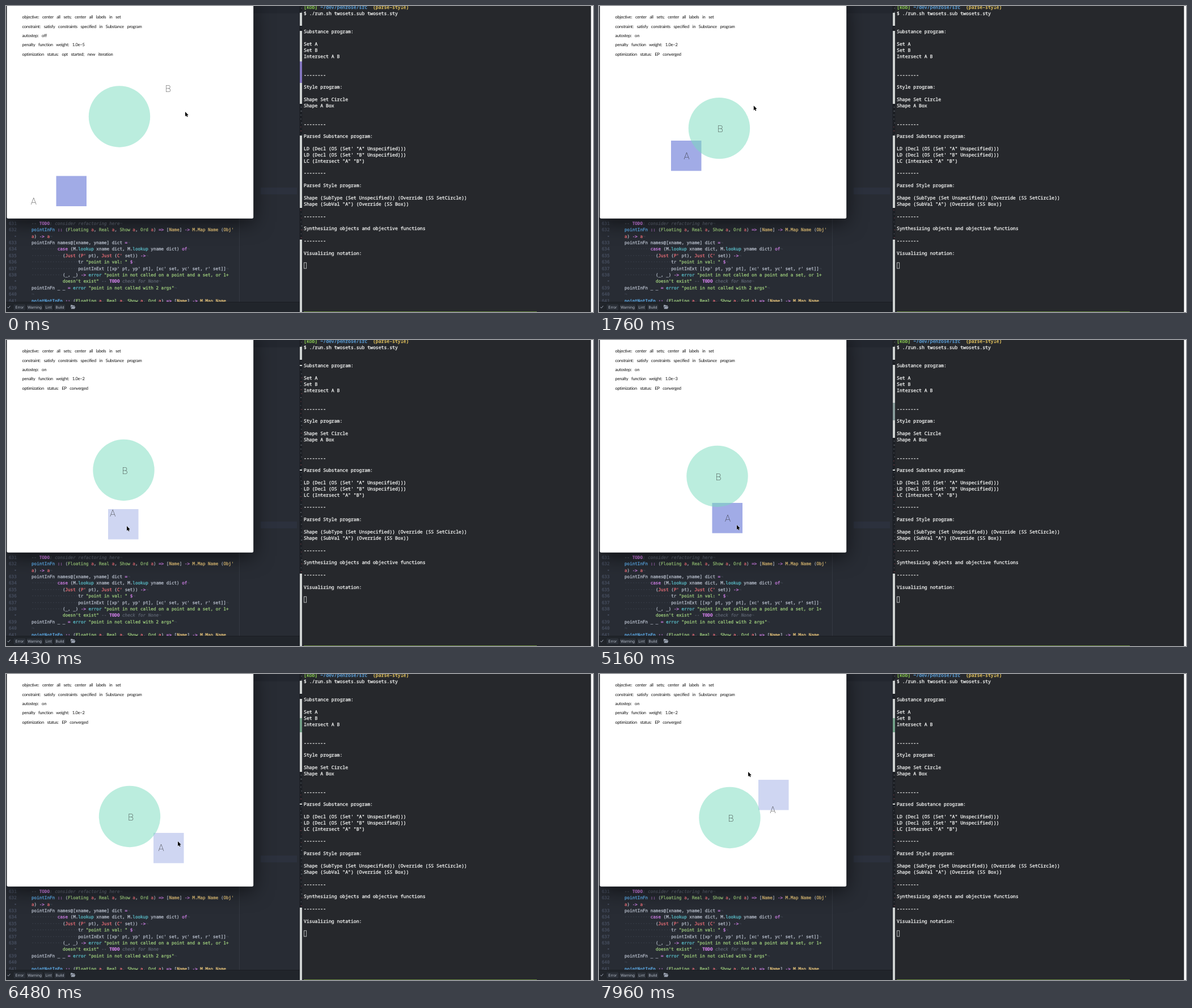
Recreate the animation shown at these times as an HTML page. Size 1035 by 541 pixels, loop 8000 ms.

```html
<!DOCTYPE html>
<html lang="en">
<head>
<meta charset="utf-8">
<title>Set diagram</title>
<style>
  html, body { margin: 0; width: 100%; height: 100%; overflow: hidden; background: #282c34; }
  svg { display: block; }
  text { white-space: pre; text-rendering: geometricPrecision; }
  .term { font: 8.13px "Noto Sans Mono", monospace; stroke-width: .3; }
  .code { font: 7.6px "DejaVu Sans Mono", monospace; stroke-width: .25; }
  .info { font: 7.6px Lato, sans-serif; letter-spacing: -.25px; word-spacing: 4px; stroke-width: 0; }
  .label { font: 200 16.8px Roboto, sans-serif; text-anchor: middle; fill: #222; }
  .bar { font: 6.4px Inter, sans-serif; stroke-width: 0; }
  .window { filter: drop-shadow(0 7px 17px rgba(0, 0, 0, .6)); }
</style>
</head>
<body>
<svg id="stage" width="1035" height="541" viewBox="0 0 1035 541"></svg>
<script>
const stage = document.getElementById('stage');
const colors = {
  w: '#b9c0cd', b: '#61b5f5', p: '#cf7fe6', g: '#a0d07e', c: '#5cc2cd', r: '#ee6f79', y: '#ecc87c',
  k: '#5c6370', d: '#3d434e', n: '#495162', t: '#f2f3f2', G: '#8fd653', B: '#5fa9e8', Y: '#f2cf62', x: '#111'
};

function set(el, attrs) {
  for (const key in attrs) el.setAttribute(key, attrs[key]);
  return el;
}
function add(tag, attrs, parent = stage) {
  return parent.appendChild(set(document.createElementNS('http://www.w3.org/2000/svg', tag), attrs));
}
function rect(x, y, width, height, fill, more) {
  return add('rect', { x, y, width, height, fill, ...more });
}
// A backtick and a letter switch the colour inside a line.
function text(cls, x, y, line, color = 'w') {
  const el = add('text', { class: cls, x, y });
  line.split(/(?=`)/).forEach(part => {
    const marked = part[0] === '`', tone = marked ? part[1] : color;
    const span = add('tspan', { fill: colors[tone], stroke: colors[tone] }, el);
    span.textContent = marked ? part.slice(2) : part;
    if (tone === 'k') span.setAttribute('font-style', 'italic');
    if (part.includes('TODO')) span.setAttribute('font-weight', 'bold');
  });
  return el;
}

// Editor
rect(0, 0, 518, 13, '#23272f');
rect(449, 321, 64, 12, '#2c313d');
rect(411, 376, 1, 147, '#343942');
const types = '`w(`gFloating `ra`w, `gReal `ra`w, `gShow `ra`w, `gOrd `ra`w) `p=> `w[`yName`w] `p-> `yM.Map Name';
const dots = n => '`d' + '·'.repeat(n);
[
  ['631', '`k-- `pTODO`k: consider refactoring here`d¬'],
  ['632', '`bpointInFn `p:: ' + types + " `w(`yObj'"],
  ['  •', '`ra`w) `p-> `ra`d¬'],
  ['633', 'pointInFn names@[xname, yname] dict `p=`d¬'],
  ['634', dots(10) + '`pcase `w(M.`clookup`w xname dict, M.`clookup`w yname dict) `pof`d¬'],
  ['635', dots(12) + "`w(`rJust `w(`rP'`w pt), `rJust `w(`rC'`w set)) `p->`d¬"],
  ['636', dots(18) + '`wtr `g"point in val: " `p$`d¬'],
  ['637', dots(18) + "`wpointInExt [[xp' pt, yp' pt], [xc' set, yc' set, r' set]]`d¬"],
  ['638', dots(12) + '`w(_, _) `p-> `cerror `g"point in not called on a point and a set, or 1+'],
  ['  •', '            `gdoesn\'t exist" `k-- `pTODO`k check for None`d¬'],
  ['639', 'pointInFn _ _ `p= `cerror `g"point in not called with 2 args"`d¬'],
  ['640', '`d¬'],
  ['641', '`bpointNotInFn `p:: ' + types]
].forEach(([num, line], i) => {
  const y = 386.7 + 11.42 * i;
  text('code', 5, y, num, 'n');
  text('code', 45, y, line);
});

// Status bar
rect(0, 523, 518, 18, '#21252b');
rect(0, 523, 518, .7, '#181a1f');
add('path', { d: 'M2.5 532.3l1.7 1.8 3.2-4', fill: 'none', stroke: '#9da5b4' });
[['Error', 13, 22], ['Warning', 36, 29], ['Lint', 67, 16], ['Build', 85, 20]].forEach(([name, x, w]) => {
  rect(x, 527, w, 11.5, '#2b3038', { rx: 1, stroke: '#191c21', 'stroke-width': .6 });
  set(text('bar', x + w / 2, 535.2, name), { 'text-anchor': 'middle' });
});
add('path', { d: 'M114 528.5h3l1 1h3v1.5h-5.5l-1.5 3zM116 531.5h6.5l-1.5 4h-6.5z', fill: '#9da5b4' });

// Strip of the window behind
const pale = '#ced2d1', strip = (y, h) => rect(518, y, 4, h, pale);
rect(517.5, 0, 5, 541, '#1c1f24');
let seed = 7;
const rnd = () => (seed = seed * 16807 % 2147483647) / 2147483647;
for (let y = 3; y < 410; y += 7) {
  const tone = ['#70767d', '#6e4048', '#51575f'][Math.floor(rnd() * 3)];
  rect(518.5 + rnd() * 2, y, 1 + rnd() * 2, 1.5, tone, { opacity: .7 });
}
strip(12, 23);
strip(44, 2);
strip(229, 2);
strip(413, 128);
const upper = strip(44, 129), accent = strip(44, 2), lower = strip(229, 128);

// Terminal
rect(522.5, 0, 509, 541, '#26282c');
rect(1031.5, 0, 3.5, 541, '#fff');
const rule = '--------';
[
  '`G[kob] `B~/dev/penrose/src  `Y(parse-style)', '$ ./run.sh twosets.sub twosets.sty', '', '',
  'Substance program:', '', 'Set A', 'Set B', 'Intersect A B', '', '', rule, '',
  'Style program:', '', 'Shape Set Circle', 'Shape A Box', '', '', rule, '',
  'Parsed Substance program:', '', 'LD (Decl (OS (Set\' "A" Unspecified)))',
  'LD (Decl (OS (Set\' "B" Unspecified)))', 'LC (Intersect "A" "B")', '', rule, '',
  'Parsed Style program:', '', 'Shape (SubType (Set Unspecified)) (Override (SS SetCircle))',
  'Shape (SubVal "A") (Override (SS Box))', '', rule, '',
  'Synthesizing objects and objective functions', '', rule, '', 'Visualizing notation:'
].forEach((line, i) => text('term', 525, 5 + 10.87 * i, line, 't'));
rect(525.5, 453.8, 4.2, 10.2, 'none', { stroke: '#d8dadb', 'stroke-width': .8 });
rect(525, 540, 411, 1, '#66883f');

// Diagram window
rect(1.5, -10, 434.7, 385.7, '#fff', { rx: 2.5, class: 'window' });
const info = [
  'objective: center all sets; center all labels in set',
  'constraint: satisfy constraints specified in Substance program', '', '', ''
].map((line, i) => text('info', 28.5, 22.3 + 16.3 * i, line, 'x').firstChild);

const side = 53.5;
const box = rect(0, 0, side, side);
const circle = add('circle', { r: 54.2, fill: 'rgb(121,219,189)', 'fill-opacity': .5 });
const [labelA, labelB] = ['A', 'B'].map(name => {
  const el = add('text', { class: 'label' });
  el.textContent = name;
  return el;
});
const pointer = add('path', {
  d: 'M0 0V8.2L1.9 6.5 3.1 9.2 4.5 8.6 3.3 5.9H5.7Z',
  stroke: '#fff', 'stroke-width': .7, 'paint-order': 'stroke'
});

// Key points: time, x, y
const pointerPath = [[0, 316, 187], [410, 209, 250], [1160, 209, 250], [1750, 273, 176], [2350, 157, 270],
  [3230, 189, 315], [4410, 213, 329], [5150, 243, 327], [5500, 243, 327], [6480, 303, 296], [6920, 330, 260],
  [7960, 263, 173]];
const boxPath = [[860, 108, 253], [1460, 127, 238], [2350, 127, 238], [3230, 159, 283], [3830, 161, 278],
  [4410, 180, 299], [5150, 199.5, 288], [5500, 199.5, 288], [5880, 246, 280], [6480, 260, 281],
  [6920, 291, 230], [7360, 279, 213], [7960, 281, 187]];
const circlePath = [[860, 206, 204], [1460, 212, 216], [3230, 211.5, 217], [4410, 207.5, 230], [5150, 208.5, 241],
  [5880, 210, 242], [6480, 218, 252], [7960, 230.5, 254]];

function at(path, t) {
  const i = Math.min(path.findIndex(p => p[0] > t) + 1 || path.length, path.length) - 1;
  if (i < 1) return path[0].slice(1);
  const [t0, x0, y0] = path[i - 1], [t1, x1, y1] = path[i];
  const u = Math.min(1, (t - t0) / (t1 - t0));
  return [x0 + (x1 - x0) * u, y0 + (y1 - y0) * u];
}
const within = (t, from, to) => t >= from && t < to;

function draw(time) {
  const step = 147.8, t = 1160 + step * Math.floor((time - 1148) / step);
  const on = t >= 860;
  const dragged = within(t, 2350, 4870) || within(t, 5500, 7060) || t >= 7500;
  const solving = within(t, 1150, 1450) || within(t, 4870, 5500) || within(t, 7060, 7500);
  const weight = !on ? 5 : t < 1150 ? 4 : solving ? 3 : 2;
  info[2].textContent = 'autostep: ' + (on ? 'on' : 'off');
  info[3].textContent = 'penalty function weight: 1.0e–' + weight;
  info[4].textContent = 'optimization status: ' + (on ? 'EP converged' : 'opt started; new iteration');

  // The label of a dragged box trails behind it.
  const lag = dragged ? 600 : 0;
  const [x, y] = on ? at(boxPath, t) : [88.5, 300.5];
  const [cx, cy] = on ? at(circlePath, t) : [200, 195.5];
  const [ax, ay] = on ? at(boxPath, t - lag).map(v => v + side / 2 + .7) : [48.8, 344.5];
  const [bx, by] = on ? [cx + 2, cy + 1.3] : [285.7, 146.2];
  set(box, { x, y, fill: dragged ? '#cfd6f2' : '#a1abe6' });
  set(circle, { cx, cy });
  set(labelA, { x: ax, y: ay + 6 });
  set(labelB, { x: bx, y: by + 6 });
  set(pointer, { transform: `translate(${at(pointerPath, t)})` });

  const [top, height, fill] = t < 410 ? [98, 38, '#8577c0']
    : within(t, 4700, 5880) ? [111, 31, '#879b99']
    : t >= 5880 ? [78, 25, '#73a088'] : [44, 2, pale];
  set(accent, { y: top, height, fill });
  set(upper, { opacity: within(t, 3970, 4700) ? 0 : 1 });
  set(lower, { opacity: t < 3970 ? 1 : 0 });
}

function frame(now) {
  draw(now % 8000);
  requestAnimationFrame(frame);
}
draw(0);
requestAnimationFrame(frame);
</script>
</body>
</html>
```
